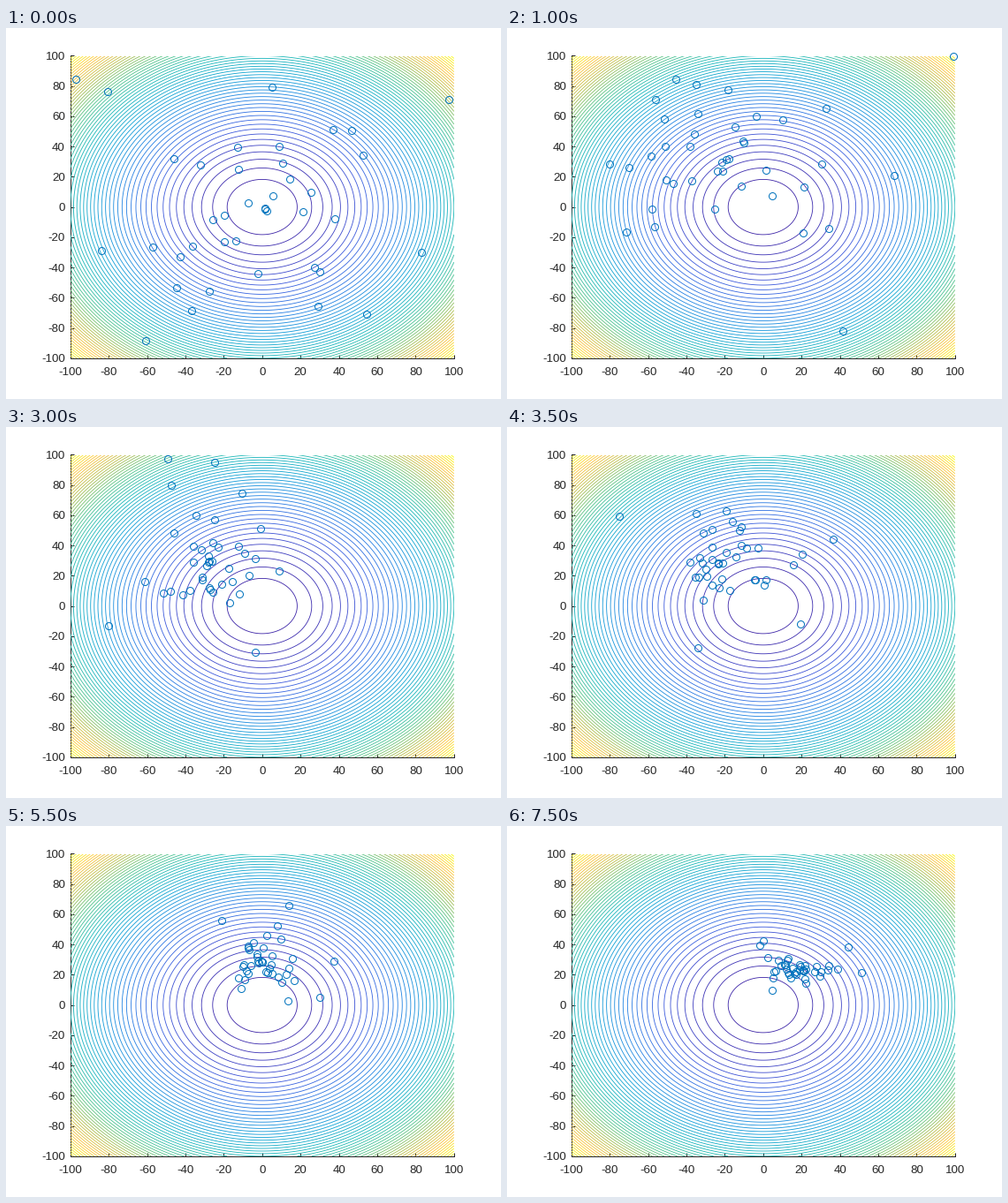
These frames come from a looping animation (560x420 px, 8000 ms). A matplotlib script:

```python
import numpy as np
import matplotlib.pyplot as plt
from matplotlib.animation import FuncAnimation
from matplotlib.colors import LinearSegmentedColormap

W, H, DPI = 560, 420, 100
STEPS, INTERVAL = 16, 500
COUNT, LIMIT = 40, 100
PX = 72 / DPI  # one pixel in points
INK = "#262626"

plt.rcParams["font.family"] = "Liberation Sans"
plt.rcParams["axes.unicode_minus"] = False

parula = LinearSegmentedColormap.from_list("parula", [
    "#3e26a8", "#3f5fe0", "#2483e4", "#10a2d6", "#1cb8b8",
    "#52c48a", "#b4be4a", "#fcc23a", "#f9fb15"])

# Path of the swarm: step, centre x, y and spread x, y
path = np.array([
    (0, 0, 0, 65, 65), (2, -20, 30, 52, 50), (4, -20, 55, 40, 32),
    (6, -27, 30, 27, 28), (9, -17, 28, 15, 19), (11, 0, 28, 15, 15),
    (15, 21, 23, 13, 9)])

# Each particle orbits the centre at its own radius, phase and pace
rng = np.random.default_rng(7)
radius = 1.05 * rng.weibull(1.3, COUNT)
phase = rng.uniform(0, 2 * np.pi, COUNT)
pace = rng.uniform(0.5, 2.5, COUNT) * rng.choice([-1, 1], COUNT)


def bounce(p):
    p = LIMIT - np.abs(LIMIT - p)
    return np.abs(p + LIMIT) - LIMIT


def swarm(step):
    cx, cy, sx, sy = (np.interp(step, path[:, 0], col) for col in path.T[1:])
    angle = phase + pace * step
    x = cx + sx * radius * np.cos(angle)
    y = cy + sy * radius * np.sin(angle)
    return bounce(x), bounce(y)


fig = plt.figure(figsize=(W / DPI, H / DPI), dpi=DPI, facecolor="white")
ax = fig.add_axes([0.13, 0.11, 0.775, 0.815])
ax.set(xlim=(-LIMIT, LIMIT), ylim=(-LIMIT, LIMIT))
ticks = np.arange(-LIMIT, LIMIT + 1, 20)
ax.set_xticks(ticks)
ax.set_yticks(ticks)
ax.set_axisbelow(True)
ax.tick_params(direction="in", length=4.3 * PX, width=PX, color=INK,
               labelcolor=INK, labelsize=13.33 * PX)
ax.tick_params(axis="x", pad=10.5 * PX)
ax.tick_params(axis="y", pad=6 * PX)
for side in ("top", "right"):
    ax.spines[side].set_visible(False)
for side in ("left", "bottom"):
    ax.spines[side].set(color=INK, linewidth=PX)

grid = np.linspace(-LIMIT, LIMIT, 201)
X, Y = np.meshgrid(grid, grid)
levels = np.arange(1, 60) * 2 * LIMIT**2 / 60
ax.contour(X, Y, X**2 + Y**2, levels=levels, cmap=parula,
           linewidths=0.85 * PX, antialiased=True, zorder=3)

dots, = ax.plot([], [], "o", ms=8 * PX, mfc="none", mec="#0072bd",
                mew=PX, clip_on=False, zorder=5)


def draw(step):
    dots.set_data(*swarm(step))
    return dots,


anim = FuncAnimation(fig, draw, frames=STEPS, interval=INTERVAL,
                     repeat=True, repeat_delay=0)
plt.show()
```
